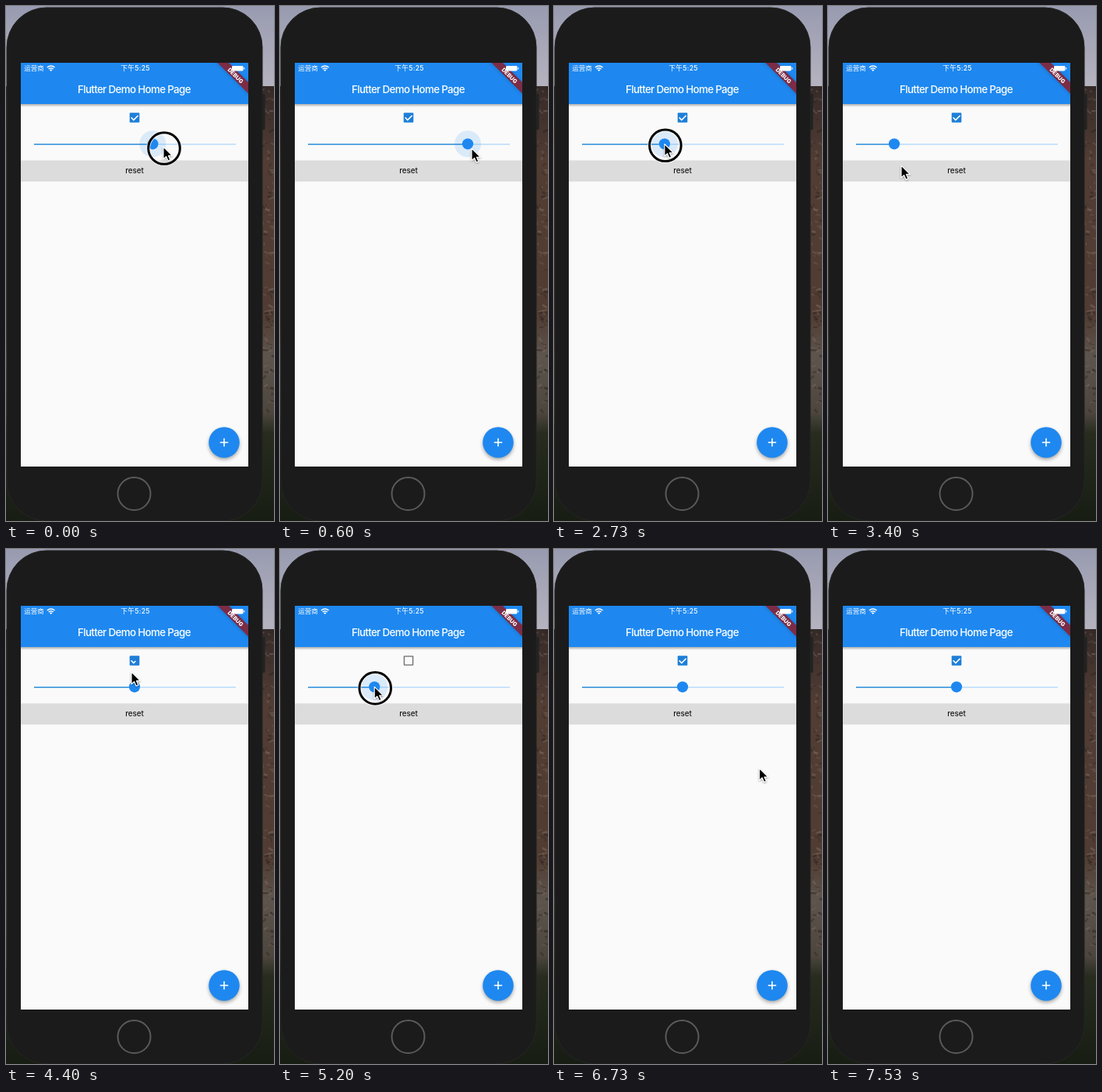
Recreate the animation shown at these times as an HTML page. Size 344 by 662 pixels, loop 7.59 s.

```html
<!DOCTYPE html>
<html lang="en">
<head>
<meta charset="utf-8">
<title>Reset demo</title>
<style>
  html, body { margin: 0; width: 100%; height: 100%; overflow: hidden; background: #1b1b1b; }
  svg { display: block; width: 100%; height: 100%; }
  text { font-family: Inter, "Noto Sans CJK SC", "Noto Sans CJK", sans-serif; }
</style>
</head>
<body>
<svg viewBox="0 0 344 662" xmlns="http://www.w3.org/2000/svg">
  <defs>
    <linearGradient id="scenery" x1="0" y1="0" x2="0" y2="1">
      <stop offset="0" stop-color="#989bb0"/>
      <stop offset=".155" stop-color="#b5b3bf"/>
      <stop offset=".155" stop-color="#352a28"/>
      <stop offset=".3" stop-color="#513d34"/>
      <stop offset=".6" stop-color="#503c32"/>
      <stop offset=".68" stop-color="#5d554d"/>
      <stop offset=".79" stop-color="#4d463e"/>
      <stop offset=".83" stop-color="#272c1f"/>
      <stop offset="1" stop-color="#171d13"/>
    </linearGradient>
    <linearGradient id="barShadow" x1="0" y1="0" x2="0" y2="1">
      <stop offset="0" stop-color="#000" stop-opacity=".3"/>
      <stop offset="1" stop-color="#000" stop-opacity="0"/>
    </linearGradient>
    <filter id="soft" x="-40%" y="-40%" width="180%" height="180%"><feGaussianBlur stdDeviation="2.6"/></filter>
    <filter id="cursorShadow" x="-50%" y="-50%" width="200%" height="200%">
      <feDropShadow dx="0" dy="1" stdDeviation=".9" flood-opacity=".4"/>
    </filter>
    <clipPath id="screenClip"><rect x="19" y="73" width="292" height="519"/></clipPath>
    <clipPath id="buttonClip"><rect x="19" y="198.5" width="292" height="26"/></clipPath>
  </defs>

  <rect width="344" height="662" fill="url(#scenery)"/>
  <g id="rocks"></g>

  <!-- phone -->
  <rect x="328" y="113" width="4.5" height="46" rx="1.5" fill="#222"/>
  <rect x="1" y="2" width="328" height="660" rx="51" fill="#1b1b1b" stroke="#252525"/>
  <circle cx="164.5" cy="627" r="21" fill="none" stroke="#5a5a5a" stroke-width="2"/>

  <!-- screen -->
  <g clip-path="url(#screenClip)">
    <rect x="19" y="73" width="292" height="519" fill="#fafafa"/>
    <rect x="19" y="126" width="292" height="4" fill="url(#barShadow)"/>
    <rect x="19" y="73" width="292" height="53" fill="#1e88f0"/>
    <text x="164.4" y="111.8" font-size="13.3" font-weight="500" letter-spacing="-.62" text-anchor="middle" fill="#fff">Flutter Demo Home Page</text>

    <path d="M268 63 L321 116" stroke="#000" stroke-opacity=".2" stroke-width="10" filter="url(#soft)"/>
    <path d="M271.5 73 H286 L311 98 V112.5 Z" fill="#7b2c46"/>
    <text transform="translate(294.5 89.5) rotate(45)" y="2.5" font-size="7.2" font-weight="800" text-anchor="middle" fill="#fff">DEBUG</text>

    <g fill="#fff">
      <text x="23.3" y="83.2" font-size="8.5">运营商</text>
      <text x="166.1" y="83.3" font-size="8.6" font-weight="500" letter-spacing=".35" text-anchor="middle">下午5:25</text>
      <g fill="none" stroke="#fff" stroke-width="1.4">
        <path d="M52.8 79 Q57.7 74.8 62.6 79"/>
        <path d="M54.6 81 Q57.7 78.3 60.8 81"/>
      </g>
      <path d="M55.9 82.1 Q57.7 80.8 59.5 82.1 L57.7 84 Z"/>
      <rect x="290" y="77" width="14.5" height="6.5" rx="1.4"/>
      <rect x="305.2" y="79" width="1.1" height="2.5" rx=".5"/>
    </g>

    <rect id="box" x="158.7" y="137.2" width="12.6" height="12.6" rx="1"/>
    <rect id="hole" fill="#fafafa"/>
    <path id="tick" d="M160.6 143.2 L163.8 146.5 L169.6 140.7" pathLength="1" fill="none" stroke="#fff" stroke-width="1.6"/>

    <rect x="36" y="177" width="259" height="1.4" fill="#b5dafa"/>
    <rect id="track" x="36" y="177" height="1.4" fill="#2589d6"/>
    <circle id="halo" cy="177.3" fill="#1e88f0" fill-opacity=".14"/>
    <circle id="thumb" cy="177.3" r="7.1" fill="#1e88f0"/>

    <rect x="19" y="199.5" width="292" height="26" fill="#000" opacity=".14"/>
    <rect x="19" y="198.5" width="292" height="26" fill="#dcdcdc"/>
    <circle id="ripple" clip-path="url(#buttonClip)"/>
    <text x="165" y="214.5" font-size="9.8" font-weight="500" text-anchor="middle" fill="#151515">reset</text>

    <circle cx="280" cy="563.5" r="19.5" opacity=".36" filter="url(#soft)"/>
    <circle cx="280" cy="561" r="19.8" fill="#1e88f0"/>
    <path d="M274.8 561 H285.2 M280 555.8 V566.2" stroke="#fff" stroke-width="1.6"/>
  </g>

  <g id="ring" fill="none">
    <circle r="20.3" stroke="#fff" stroke-opacity=".75" stroke-width="5"/>
    <circle r="20.3" stroke="#000" stroke-width="3"/>
  </g>
  <g id="cursor">
    <path d="M0 -.8 V14.7 L3.6 11.4 L6.1 17 L8.8 15.8 L6.4 10.4 H11.3 Z" stroke="#fff" stroke-width="1.1" stroke-linejoin="round" filter="url(#cursorShadow)"/>
  </g>
</svg>
<script>
const LOOP = 7590;
const $ = id => document.getElementById(id);
const set = (id, attrs) => {
  for (const name in attrs) $(id).setAttribute(name, attrs[name]);
};
const clamp = v => Math.max(0, Math.min(1, v));
const linear = u => u;
const smooth = u => u * u * (3 - 2 * u);

// keys: [time, value, value...]
function tween(keys, t, ease) {
  let i = 0;
  while (i < keys.length - 2 && t >= keys[i + 1][0]) i++;
  const a = keys[i], b = keys[i + 1];
  const u = ease(clamp((t - a[0]) / (b[0] - a[0])));
  return a.slice(1).map((v, k) => v + (b[k + 1] - v) * u);
}

const CURSOR = [
  [0, 202, 182], [80, 202, 182], [520, 241, 181], [570, 241, 181], [600, 246, 184],
  [1350, 217, 207], [2000, 217, 207], [2400, 165, 178], [2500, 165, 178],
  [3150, 85, 179], [3250, 85, 179], [3400, 94, 206], [3550, 96, 211], [3850, 96, 211],
  [4200, 161, 159], [4430, 161, 159], [4700, 165, 177], [4850, 165, 177],
  [5300, 115, 178], [5400, 115, 178], [5700, 120, 212], [6250, 120, 212], [7100, 360, 330]
];
const THUMB = [
  [0, 188], [40, 202], [80, 202], [520, 241], [1640, 241], [1719, 165],
  [2500, 165], [3150, 85], [3790, 85], [3870, 165],
  [4850, 165], [5300, 115], [5850, 115], [5933, 165]
];
const DRAGS = [[-90, 590], [2430, 3250], [4770, 5390]];
const TAPS = [[1560, 1640], [3710, 3790], [5770, 5850]];
const PRESSES = [...DRAGS, ...TAPS, [4290, 4365]];
const UNCHECK = 4365, RECHECK = 5850;
const RIPPLE_FADE = 240;

const during = (spans, t) => spans.some(([from, to]) => t >= from && t < to);

function checkLevel(t) {
  if (t >= RECHECK) return clamp((t - RECHECK) / 200) ** 2;
  return 1 - clamp((t - UNCHECK) / 200);
}

function drawCheckbox(level) {
  const mix = clamp(level * 3);
  const color = [30, 127, 216].map(v => Math.round(v * mix));
  const half = Math.max(0, 4.9 - 13 * level);
  const drawn = clamp(level * 2 - 1);
  set("box", { fill: `rgb(${color})`, "fill-opacity": 0.54 + 0.46 * mix });
  set("hole", { x: 165 - half, y: 143.5 - half, width: half * 2, height: half * 2 });
  set("tick", { "stroke-dasharray": `${drawn} 2`, visibility: drawn > 0 ? "visible" : "hidden" });
}

function drawRipple(t, x) {
  const tap = TAPS.find(([down, up]) => t >= down && t < up + RIPPLE_FADE);
  if (!tap) return set("ripple", { r: 0 });
  const age = t - tap[1];
  const r = age < 0 ? 10 * clamp((t - tap[0]) / 80) : 10 + 0.46 * age;
  set("ripple", { cx: x, cy: 209, r, "fill-opacity": 0.13 * (1 - clamp(age / RIPPLE_FADE)) });
}

function draw(t) {
  const [x, y] = tween(CURSOR, t, smooth);
  const dragging = t > 80 && during(DRAGS, t);
  const [thumb] = tween(THUMB, t, dragging ? smooth : linear);
  const halo = Math.max(...DRAGS.map(([down, up]) =>
    Math.min(clamp((t - down) / 90), 1 - clamp((t - up - 15) / 100))));

  set("track", { width: thumb - 36 });
  set("thumb", { cx: thumb });
  set("halo", { cx: thumb, r: 17 * halo });
  drawCheckbox(checkLevel(t));
  drawRipple(t, x);
  set("cursor", { transform: `translate(${x} ${y})` });
  set("ring", {
    transform: `translate(${x + 1} ${y + 1})`,
    visibility: during(PRESSES, t) ? "visible" : "hidden"
  });
}

function scatterRocks() {
  let seed = 7;
  const random = () => (seed = seed * 16807 % 2147483647) / 2147483647;
  const tones = ["#2c2320", "#6d594d", "#7d6c61", "#3a2d27"];
  let marks = "";
  for (let i = 0; i < 110; i++) {
    const y = 108 + random() * 415;
    marks += `<path d="M${328 + random() * 14} ${y} l${random() * 8} ${random() * 9 - 4}" stroke="${tones[i % 4]}" stroke-width="${1 + random() * 2}" opacity=".5"/>`;
  }
  $("rocks").innerHTML = marks;
}

scatterRocks();
const start = performance.now();
function frame() {
  draw((performance.now() - start) % LOOP);
  requestAnimationFrame(frame);
}
frame();
</script>
</body>
</html>
```
